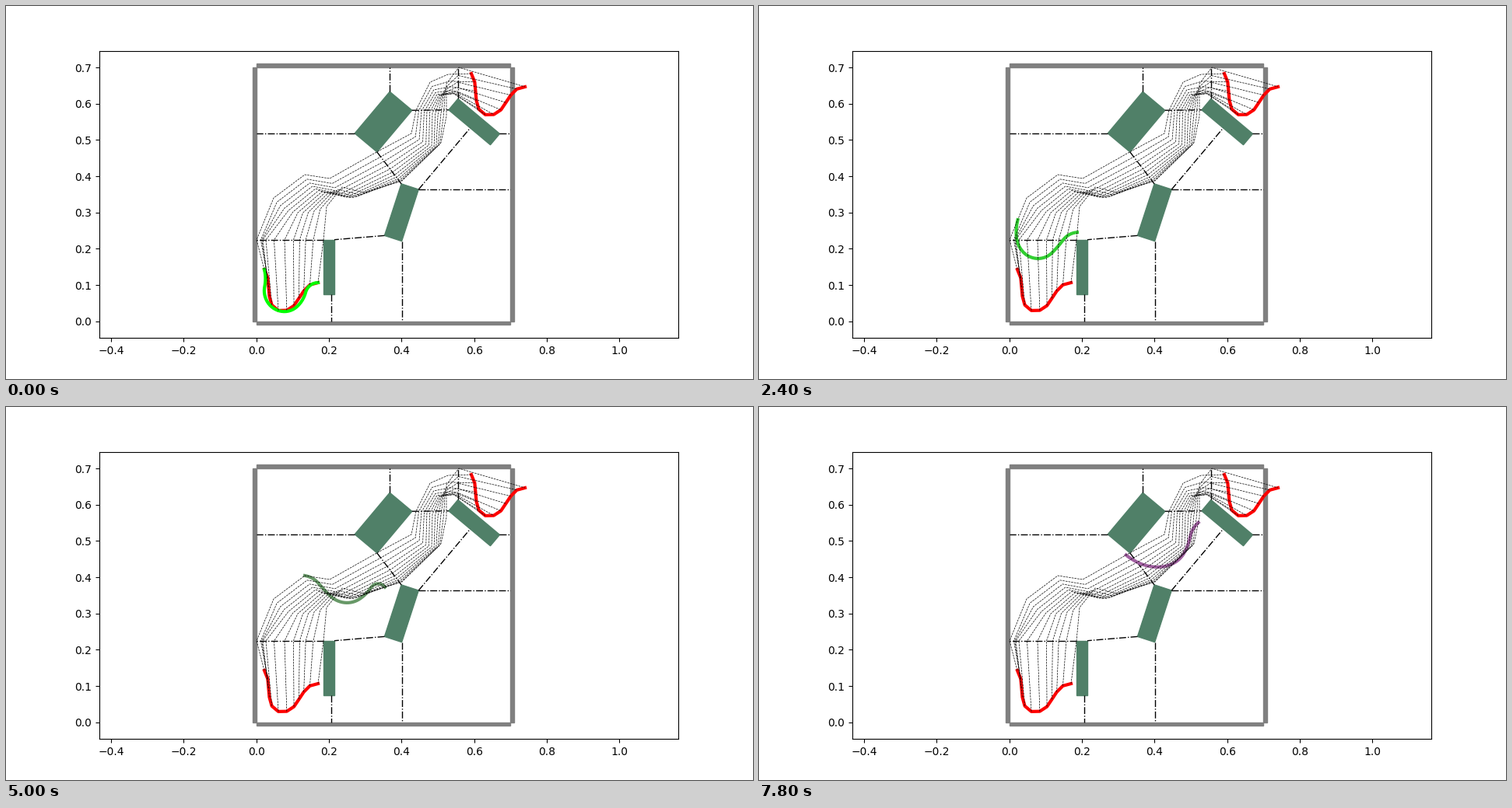
Write a matplotlib script that moves like this. It is 960x480 px and loops after 8 s.

```python
import numpy as np
import matplotlib.pyplot as plt
from matplotlib.animation import FuncAnimation
from matplotlib.patches import Polygon, Rectangle

STEP, FRAMES, NODES = 200, 40, 12
SCALE, X0, Y0 = 466.67, 321.67, 405.73   # pixels per unit, pixel position of the origin


def world(pts):
    """Stage pixels to plot units."""
    return (np.asarray(pts, float) - [X0, Y0]) * [1, -1] / SCALE


def bend(first, last, angles, n):
    """Cord of fixed length with the given headings, pinned at both ends."""
    s = np.linspace(0, 1, 133)
    a = np.radians(np.interp(s, np.linspace(0, 1, len(angles)), angles))
    step = np.column_stack([np.cos(a), -np.sin(a)])
    pts = first + np.vstack([[0, 0], np.cumsum((step[1:] + step[:-1]) / 2, axis=0)])
    pts += s[:, None] * (last - pts[-1])
    return pts[np.linspace(0, 132, n).round().astype(int)]


def bow(first, mid, last):
    """Nodes on the parabola through three points."""
    fit = np.polyfit([0, 6, 11], np.array([first, mid, last], float), 2)
    return np.vander(np.arange(NODES), 3) @ fit


fig = plt.figure(figsize=(9.6, 4.8), dpi=100)
ax = fig.add_subplot()
ax.set_xlim(0.365 - 0.79714, 0.365 + 0.79714)
ax.set_ylim(-0.046, 0.746)

# Walls
for x, y, w, h in [(0, -.01, .7, .01), (0, .7, .7, .01),
                   (-.01, 0, .01, .7), (.7, 0, .01, .7)]:
    ax.add_patch(Rectangle((x, y), w, h, color="gray"))


def block(cx, cy, width, deg):
    a = np.radians(deg)
    u = np.array([np.cos(a), np.sin(a)]) * 0.075
    v = np.array([np.sin(a), -np.cos(a)]) * width / 2
    pts = np.array([u - v, u + v, v - u, -u - v]) + [cx, cy]
    ax.add_patch(Polygon(pts, color="#508068"))
    return pts


A = block(.35, .55, .08, 50)
B = block(.60, .55, .04, -40)
C = block(.40, .30, .05, 72)
D = block(.20, .15, .03, 90)

# Passages between obstacles and walls
edge = B[2] - B[1]
foot = B[1] + edge * np.dot(C[1] - B[1], edge) / np.dot(edge, edge)
for p, q in [
    (A[3], (0, A[3][1])), (A[0], (A[0][0], .7)), (A[1], B[2]), (A[2], C[0]),
    (B[3], (B[3][0], .7)), (B[0], (.7, B[0][1])), (C[1], foot),
    (C[1], (.7, C[1][1])), (C[3], D[1]), (C[2], (C[2][0], 0)),
    (D[0], (0, D[0][1])), ((.2064, .075), (.2064, 0)),
]:
    ax.plot([p[0], q[0]], [p[1], q[1]], "k-.", lw=1)

# Start and goal curves
start = bend(np.array([332, 339]), np.array([401, 356]), [-55, -86, -70, 3, 54, 52, 0], NODES)
goal = start + np.array([.57, -.54]) * SCALE
for curve in (start, goal):
    ax.plot(*world(curve).T, color="red", lw=3)

# Node paths run through a row of bowed stations
gate = np.column_stack([322 + (start[:, 0] - 332) * 86 / 69, np.full(NODES, 301)])
stations = np.array([
    start, gate,
    bow((344, 247), (375, 266), (412, 258)),
    bow((384, 217), (406, 239), (432, 233)),
    bow((416, 222), (438, 246), (460, 240)),
    bow((478, 187), (500, 217), (509, 225)),
    bow((521, 164), (547, 180), (559, 176)),
    bow((527, 134), (548, 138), (566, 142)),
    bow((545, 98), (558, 115), (566, 100)),
    bow((568, 88), (577, 112), (582, 79)),
    goal,
])
for i in range(NODES):
    ax.plot(*world(stations[:, i]).T, "k--", lw=0.5, zorder=4)

# Key poses: station reached by each end, then headings along the cord
POSES = np.array([
    [0, 0, -75, -100, -55, -8, 42, 74, 0],
    [1.33, 1.07, -97, -80, -43, 0, 46, 50, 0],
    [1.95, 1.72, -115, -92, -60, -14, 32, 54, 10],
    [2.68, 3.25, -170, -97, -43, 6, 49, 39, 5],
    [3, 4.55, -8, -47, -42, -6, 32, 54, -50],
    [4.1, 5.32, -10, -28, -36, 3, 50, 66, -30],
    [4.9, 6.8, -38, -21, -1, 25, 60, 77, 40],
])
TIMES = [0, 1200, 1600, 2400, 3200, 3600, 4000, 5000, 5800, 6000, 7200, 7800]
PHASES = [0, .84, 1, 1.24, 2, 2.4, 3, 4, 5, 5.24, 5.8, 6]


def mix(rows, pos):
    """Linear blend of neighbouring rows at a fractional index."""
    k = min(int(pos), len(rows) - 2)
    return rows[k] + (rows[k + 1] - rows[k]) * (pos - k)


cord, = ax.plot([], [], lw=3, zorder=3)


def draw(i):
    t = i * STEP
    left, right, *angles = mix(POSES, np.interp(t, TIMES, PHASES))
    first, last = mix(stations[:, 0], left), mix(stations[:, -1], right)
    cord.set_data(*world(bend(first, last, angles, 45)).T)
    c = t / 12400
    cord.set_color((c, 1 - c, c))
    return cord,


anim = FuncAnimation(fig, draw, frames=FRAMES, interval=STEP, repeat=True, repeat_delay=0)
plt.show()
```
